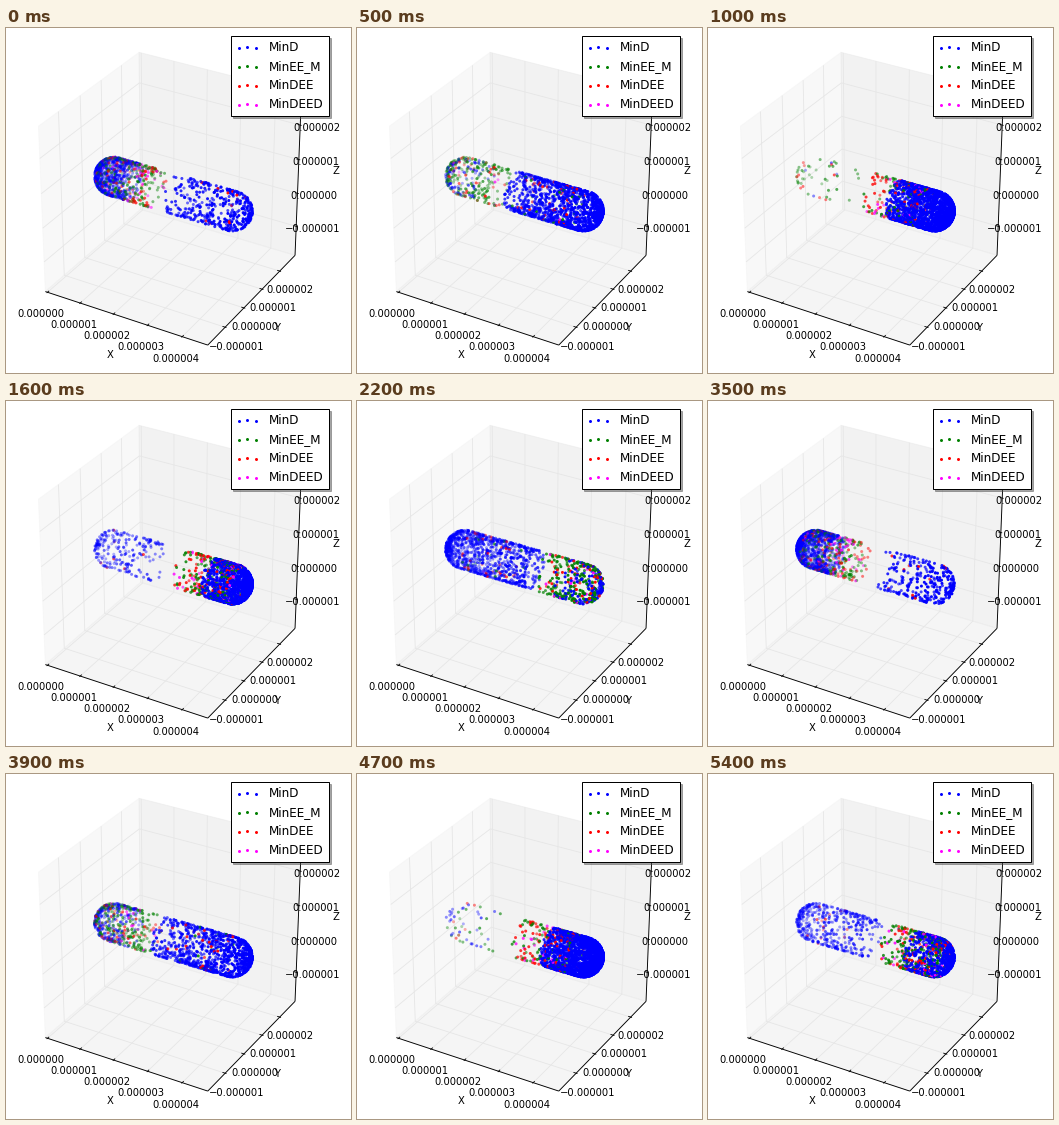
A matplotlib script for the animation above (5.5 s loop, 345 by 345 pixels).

```python
import numpy as np
import matplotlib.pyplot as plt
from matplotlib.animation import FuncAnimation
from matplotlib.patches import Polygon, Rectangle

SIZE, DPI = 345, 60
FRAMES, STEP = 55, 0.1
PERIOD = 3.6
PT = 72 / DPI
SPAN = 4.6                     # data units along each side of the cube
EDGE = 0.5 + 1 / 48            # half side of the drawn panes
MID = (2.33, 0.5, 0.5)
LENGTH, RADIUS = 4.5, 0.5      # the rod-shaped cell
DOT = 13

# name: colour, peak count, time of the peak, rise and fall widths
SPECIES = {
    "MinD": ((0, 0, 1), 2100, 1.1, 0.61, 0.48),
    "MinEE_M": ((0, 0.5, 0), 230, 2.1, 0.75, 0.36),
    "MinDEE": ((1, 0, 0), 120, 1.45, 0.7, 0.6),
    "MinDEED": ((1, 0, 1), 60, 1.6, 0.45, 0.35),
}

plt.rcParams["font.family"] = "DejaVu Sans"
fig = plt.figure(figsize=(SIZE / DPI, SIZE / DPI), dpi=DPI, facecolor="white")
ax = fig.add_axes([0, 0, 1, 1])
ax.set_xlim(0, SIZE)
ax.set_ylim(SIZE, 0)
ax.axis("off")


def project(x, y, z):
    """Perspective view of the centred unit cube: pixel x, pixel y, depth."""
    el, az = np.radians(30), np.radians(-60)
    toward = np.cos(az) * x + np.sin(az) * y
    u = -np.sin(az) * x + np.cos(az) * y
    v = -np.sin(el) * toward + np.cos(el) * z
    dist = 10 - np.cos(el) * toward - np.sin(el) * z
    return 166.2 + 1800 * u / dist, 165.5 - 1812 * v / dist, dist


def line(p, q, color, width=1.0, z=2):
    (x0, y0, _), (x1, y1, _) = project(*p), project(*q)
    ax.plot([x0, x1], [y0, y1], color=color, lw=width, zorder=z,
            solid_capstyle="butt")


def pane(corners, shade):
    points = [project(*c)[:2] for c in corners]
    rgba = (shade, shade, shade, 0.5)
    ax.add_patch(Polygon(points, facecolor=rgba, edgecolor=rgba, lw=1, zorder=0))


def draw_box():
    e = EDGE
    a, b, c, d = (-e, -e, -e), (e, -e, -e), (e, e, -e), (-e, e, -e)
    a1, c1, d1 = (-e, -e, e), (e, e, e), (-e, e, e)
    pane([a, d, d1, a1], 0.95)
    pane([d, c, c1, d1], 0.90)
    pane([a, b, c, d], 0.925)
    for p, q in ((a, b), (b, c), (c, c1)):
        line(p, q, "black", 1.1, 3)


def draw_ticks():
    e, gap = EDGE, EDGE + 0.07
    out, inn = 0.1 / 12, 0.2 / 12
    axes = (
        (range(5), lambda s: [(s, -e, -e), (s, e, -e), (s, e, e)],
         lambda s: [(s, -e - out, -e), (s, -e + inn, -e)],
         lambda s: (s, -gap, -gap)),
        (range(-1, 3), lambda s: [(e, s, -e), (-e, s, -e), (-e, s, e)],
         lambda s: [(e + out, s, -e), (e - inn, s, -e)],
         lambda s: (gap, s, -gap)),
        (range(-1, 3), lambda s: [(-e, -e, s), (-e, e, s), (e, e, s)],
         lambda s: [(e + out, e, s), (e - inn, e, s)],
         lambda s: (gap, gap, s)),
    )
    for (values, grid, tick, label), mid in zip(axes, MID):
        for value in values:
            s = (value - mid) / SPAN
            g = grid(s)
            line(g[0], g[1], "0.9", z=1)
            line(g[1], g[2], "0.9", z=1)
            line(*tick(s), "black", z=3)
            x, y, _ = project(*label(s))
            sign = "\u2212" if value < 0 else ""
            ax.text(x, y, f"{sign}0.00000{abs(value)}", fontsize=10 * PT,
                    ha="center", va="top", zorder=4)
    for name, x, y in (("X", 104, 327), ("Y", 271, 300), ("Z", 330, 142.5)):
        ax.text(x, y, name, fontsize=10 * PT, ha="center", va="center", zorder=4)


def draw_legend():
    left, top, width, height = 224.5, 7.5, 98, 80
    ax.add_patch(Rectangle((left + 2.3, top + 2.3), width, height,
                           facecolor="0.3", edgecolor="0.3", alpha=0.5, lw=1,
                           zorder=8))
    ax.add_patch(Rectangle((left, top), width, height, facecolor="white",
                           edgecolor="black", lw=1.2, zorder=9))
    for row, (name, (color, *_)) in enumerate(SPECIES.items()):
        y = top + 11.5 + 19 * row
        ax.scatter([left + 8.2, left + 16.6, left + 25], [y + 0.6, y - 0.4, y + 1],
                   s=DOT, color=[color], linewidths=0, zorder=10)
        ax.text(left + 38, y + 4, name, fontsize=12 * PT, va="baseline", zorder=10)


def bell(x, width):
    return np.exp(-0.5 * (x / width) ** 2)


def wrap(time, start):
    """Shift a time by whole periods into the period that begins at start."""
    return (time - start) % PERIOD + start


def population(name, time):
    """How many molecules of a kind sit near a pole at its local time."""
    _, count, peak, rise, fall = SPECIES[name]
    lag = wrap(time - peak, -PERIOD / 2)
    return int(round(count * bell(lag, rise if lag < 0 else fall)))


def distance(name, time, place):
    """Distance from the pole: a shrinking cap of MinD, the rest in a ring."""
    if name == "MinD":
        return (1.1 + 1.5 * bell(time - 0.35, 0.45)) * place ** 1.6
    front = 0.8 * bell(time - 0.8, 0.6)
    return front + 1.6 * place ** 1.2


rng = np.random.default_rng(7)


def walkers(count):
    """Random walks of place (folded into 0..1) and angle for each molecule."""
    shape = (FRAMES, count)
    place = rng.random(count) + np.cumsum(rng.normal(0, 0.06, shape), axis=0)
    place = 1 - np.abs(place % 2 - 1)
    angle = rng.random(count) * 2 * np.pi
    return place, angle + np.cumsum(rng.normal(0, 0.16, shape), axis=0)


WALKS = {(name, side): walkers(spec[1])
         for name, spec in SPECIES.items() for side in (-1, 1)}


def molecules(frame):
    """Cube coordinates and colours of every molecule in one frame."""
    points, colors = [], []
    for (name, side), (place, angle) in WALKS.items():
        delay = 0 if side > 0 else PERIOD / 2
        time = wrap(frame * STEP + delay, -0.9)
        n = population(name, time)
        d = distance(name, time, place[frame, :n])
        phi = angle[frame, :n]
        r = np.sqrt(RADIUS ** 2 - np.clip(RADIUS - d, 0, RADIUS) ** 2)
        xyz = [side * (LENGTH / 2 - d), r * np.cos(phi), r * np.sin(phi)]
        points.append(np.array(xyz) / SPAN)
        colors.append(np.tile(SPECIES[name][0], (n, 1)))
    return np.hstack(points), np.vstack(colors)


draw_box()
draw_ticks()
draw_legend()
dots = ax.scatter([], [], s=DOT, linewidths=0, zorder=5)


def update(frame):
    points, colors = molecules(frame)
    x, y, depth = project(*points)
    order = np.argsort(-depth)
    fade = 1 - 0.7 * (depth - depth.min()) / np.ptp(depth)
    dots.set_offsets(np.column_stack([x, y])[order])
    dots.set_facecolor(np.column_stack([colors, fade])[order])
    return (dots,)


anim = FuncAnimation(fig, update, frames=FRAMES, interval=100, repeat=True,
                     repeat_delay=0)
plt.show()
```
